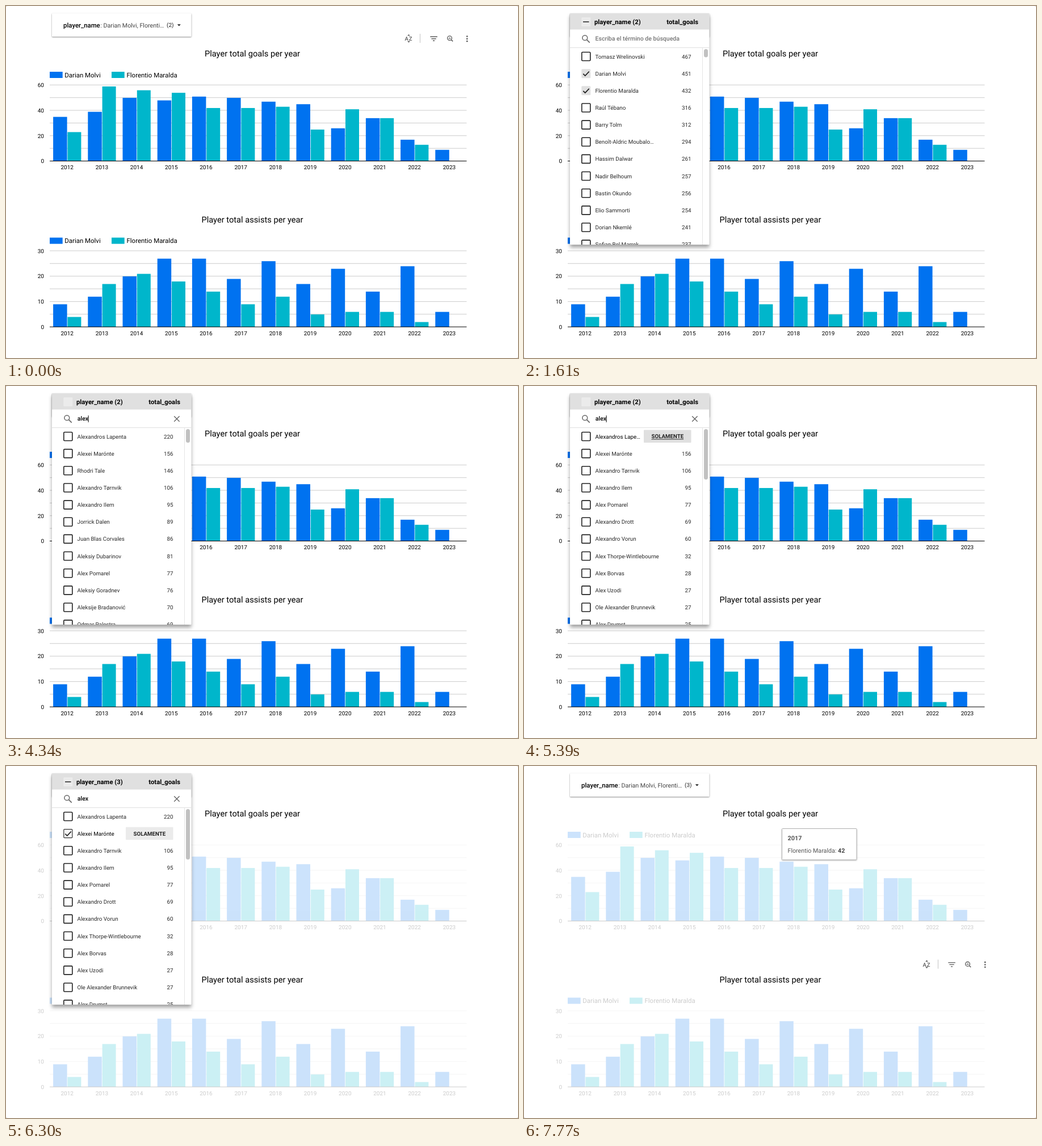
Recreate the animation shown at these times as an HTML page. Size 902 by 621 pixels, loop 8 s.

```html
<!DOCTYPE html>
<html lang="es">
<head>
<meta charset="utf-8">
<title>Player dashboard</title>
<style>
  html, body { margin: 0; width: 100%; height: 100%; overflow: hidden; background: #d4d4d4; }
  svg { display: block; width: 902px; height: 621px; background: #fff; border-radius: 3px; }
  text { font-family: Roboto, Arial, sans-serif; white-space: pre; text-rendering: geometricPrecision; }
  .card { filter: drop-shadow(0 1px 1.2px rgba(0, 0, 0, .45)); }
  .panel { filter: drop-shadow(0 5px 3.2px rgba(0, 0, 0, .36)); }
  .tip { filter: drop-shadow(0 1px 1px rgba(0, 0, 0, .25)); }
</style>
</head>
<body>
<svg viewBox="0 0 902 621">
  <defs><clipPath id="clip"><rect x="81" y="13" width="245.5" height="408"/></clipPath></defs>
  <g id="charts"></g>
  <g id="titles"></g>
  <g id="ui"></g>
</svg>
<script>
const LOOP = 8000, TICK = 70;
const BLUE = '#0072f0', TEAL = '#00b6cb', CHART_GAP = 292.6;
const PLAYERS = ['Darian Molvi', 'Florentio Maralda'];
const $ = id => document.getElementById(id);

const text = (x, y, s, size, { w = 400, fill = '#000', at = 'start', more = '' } = {}) =>
  `<text x="${x}" y="${y}" font-size="${size}" font-weight="${w}" fill="${fill}" text-anchor="${at}" ${more}>${s}</text>`;
const rect = (x, y, w, h, fill, more = '') =>
  `<rect x="${x}" y="${y}" width="${w}" height="${h}" fill="${fill}" ${more}/>`;
const line = (d, color, width) =>
  `<path d="${d}" fill="none" stroke="${color}" stroke-width="${width}"/>`;

// Charts
function chart(top, max, series) {
  const base = top + 134.2, unit = 134.2 / max;
  let out = '';
  PLAYERS.forEach((name, k) => {
    out += rect(k ? 186 : 77, top - 23.3, 22.7, 11, k ? TEAL : BLUE);
    out += text(k ? 212.5 : 103.3, top - 13.5, name, 11.45);
  });
  for (let k = 0; k <= 6; k++) {
    const y = base - k * 134.2 / 6;
    if (k) out += rect(77, y - .5, 734.5, 1, '#ccc');
    if (k % 2 === 0) out += text(67, y + 3.8, max * k / 6, 10, { at: 'end' });
  }
  // Bars sit slightly below their value, so the top edge is inset
  series.forEach((values, k) => values.forEach((v, i) => {
    const h = Math.max(0, v * unit - .4);
    out += rect(83.1 + 61.2 * i + 25.3 * k, base - h, k ? 24 : 24.5, h, k ? TEAL : BLUE);
  }));
  for (let i = 0; i < 12; i++) out += text(107.7 + 61.2 * i, base + 14.7, 2012 + i, 10, { at: 'middle' });
  return out + rect(77, base - .5, 734.5, 1, '#000');
}

$('charts').innerHTML =
  chart(139.3, 60, [
    [35, 39, 50, 48, 51, 50, 47, 45, 26, 34, 17, 9],
    [23, 59, 56, 54, 42, 42, 43, 25, 41, 34, 13, 0]]) +
  chart(139.3 + CHART_GAP, 30, [
    [9, 12, 20, 27, 27, 19, 26, 17, 23, 14, 24, 6],
    [4, 17, 21, 18, 14, 9, 12, 5, 6, 6, 2, 0]]);
$('titles').innerHTML = ['goals', 'assists'].map((s, i) =>
  text(434, 89 + CHART_GAP * i, `Player total ${s} per year`, 14.65, { at: 'middle' })).join('');

// Dropdown lists
const parse = s => s.split('|').map(r => r.match(/(.+) (\d+)/).slice(1));
const LISTS = {
  all: parse('Tomasz Wrelinovski 467|Darian Molvi 451|Florentio Maralda 432|Raúl Tébano 316|Barry Tolm 312|' +
    'Benoît-Aldric Moubalo… 294|Hassim Dalwar 261|Nadir Belhoum 257|Bastin Okundo 256|Elio Sammorti 254|' +
    'Dorian Nkemlé 241|Sofian Bel Marrek 237'),
  al: parse('Florentio Maralda 432|Hassim Dalwar 261|Alexandros Lapenta 220|Balto Ferrune 198|Donal Brisk 187|' +
    'Valdo Quirente 171|Alexei Marónte 156|Rhodri Tale 146|Galdric Monse 139|Alvino Pradesh 128|' +
    'Osval Trindo 117|Alexandro Tørnvik 106'),
  ale: parse('Alexandros Lapenta 220|Alexei Marónte 156|Rhodri Tale 146|Alexandro Tørnvik 106|Alexandro Ilem 95|' +
    'Jorrick Dalen 89|Juan Blas Corvales 86|Aleksiy Dubarinov 81|Alex Pomarel 77|Aleksiy Goradnev 76|' +
    'Aleksije Bradanović 70|Odmar Palestra 69'),
  alex: parse('Alexandros Lapenta 220|Alexei Marónte 156|Alexandro Tørnvik 106|Alexandro Ilem 95|Alex Pomarel 77|' +
    'Alexandro Drott 69|Alexandro Vorun 60|Alex Thorpe-Wintlebourne 32|Alex Borvas 28|Alex Uzodi 27|' +
    'Ole Alexander Brunnevik 27|Alex Drumst 25')
};
const THUMB = { all: 14.5, al: 14.5, ale: 24, alex: 89 };
const CARET = [126, 132, 134.7, 140, 144.6];

// Value of the last step that has begun
const pick = (t, steps) => steps.reduce((v, [at, next]) => t >= at ? next : v, null);
const clamp = v => Math.min(1, Math.max(0, v));

function checkbox(y, checked, fill) {
  if (!checked) return rect(101.8, y - 7.5, 15, 15, '#fff', 'rx="1.2" stroke="#222" stroke-width="1.6"');
  const edge = 1 - fill;
  return rect(101.3, y - 8, 16, 16, '#e0e0e0', `rx="1.5" fill-opacity="${.3 + .7 * fill}"`) +
    rect(101.8, y - 7.5, 15, 15, 'none', `rx="1.2" stroke="#333" stroke-width="1.2" stroke-opacity="${edge}"`) +
    line(`M104.3 ${y + .5}l3.4 3.4 7-7.4`, '#222', 1.7);
}

function row([name, goals], i, t, hover, fill) {
  const y = 89 + 30.15 * i, over = hover === i;
  const checked = PLAYERS.includes(name) || (t >= 6230 && name === 'Alexei Marónte');
  const label = over && i === 0 ? 'Alexandros Lape…' : name;
  let out = checkbox(y, checked, name === 'Alexei Marónte' ? fill : 1) +
    text(125.5, y + 3.5, label, 9.8, { fill: over ? '#000' : '#2a2a2a' });
  if (!over) return out + text(294.5, y + 3.5, goals, 9.8, { fill: '#2a2a2a', at: 'end' });
  return out + rect(211, y - 11.5, 83.5, 22.5, i ? '#ebebeb' : '#e0e0e0', 'rx="1"') +
    text(252.8, y + 3.4, 'SOLAMENTE', 9.7, { w: 700, fill: '#222', at: 'middle', more: i ? '' : 'text-decoration="underline"' });
}

function panel(t) {
  const list = pick(t, [[0, 'all'], [3710, 'al'], [4060, 'ale'], [4480, 'alex']]);
  const query = pick(t, [[0, ''], [3430, 'a'], [3640, 'al'], [3990, 'ale'], [4340, 'alex']]);
  const caret = pick(t, [[0, 0], [3010, 1], [4900, 0], [5390, 1], [5950, 0]]);
  const hover = pick(t, [[0, -1], [4900, 0], [5670, -1], [5740, 1], [7000, -1]]);
  const count = t < 6230 ? 2 : 3;
  const some = t < 4060 || t >= 6230;
  const fill = clamp((t - 6300) / 280);
  const grow = 1 - (1 - clamp((t - 1225) / 200)) ** 3;
  const shown = clamp((t - 1325) / 280);

  let body = rect(81, 13, 245.5, 28.5, '#e0e0e0') + rect(101.3, 20, 16, 16, '#ebebeb', 'rx="1.5"');
  if (some) body += rect(104, 27.2, 10.5, 1.5, '#222');
  body += text(124, 32, `player_name (${count})`, 11.3, { w: 700 }) + text(307, 32, 'total_goals', 11.3, { w: 700, at: 'end' });
  body += '<circle cx="107.3" cy="56.2" r="4.4" fill="none" stroke="#666" stroke-width="1.5"/>' + line('M110.5 59.4l5.2 5.2', '#666', 1.7);
  body += query ? text(125.7, 61.3, query, 10.6, { w: 500 })
    : text(125.5, 61.3, 'Escriba el término de búsqueda', 10.55, { w: 500, fill: '#757575' });
  if (caret) body += rect(CARET[query.length], 52, 1, 12, '#000');
  if (t >= 3710) body += line('M296.2 53.3l9.4 9.4m0-9.4l-9.4 9.4', '#666', 1.4);
  body += rect(81, 73, 245.5, 1, '#e0e0e0') + rect(314, 74, 1, 347, '#e4e4e4');
  body += rect(317, 76, 7, THUMB[list], '#c1c1c1', 'rx="3.5"');
  body += LISTS[list].map((r, i) => row(r, i, t, hover, fill)).join('');

  return `<g opacity="${grow}" transform="translate(0 13) scale(1 ${.1 + .9 * grow}) translate(0 -13)">` +
    rect(81, 13, 245.5, 408, '#fff', 'class="panel" rx="1"') +
    `<g clip-path="url(#clip)" opacity="${shown}">${body}</g></g>`;
}

function filterCard(count) {
  return rect(81, 13, 245.5, 41, '#fff', 'class="card" rx="1"') +
    text(101, 37.6, 'player_name', 11.4, { w: 500 }) +
    text(166.2, 37.6, `: ${PLAYERS[0]}, Florenti…`, 10.7, { fill: '#444' }) +
    text(283, 36.8, `(${count})`, 10, { fill: '#222' }) +
    '<path d="M301.8 32.3h6l-3 3.2z" fill="#222"/>';
}

function toolbar(dy) {
  const c = '#5a5a5a';
  let out = text(702.6, 61, 'A', 9.6, { w: 500, fill: c }) + text(709.8, 61, 'Z', 9.6, { w: 500, fill: c }) +
    `<path d="M707 52.6h5l-2.5-2.6zM707 61.9h5l-2.5 2.6z" fill="${c}"/>` +
    rect(729, 49, 1, 16, '#c4c4c4') +
    line('M747.3 54.3h12.6M749.4 57.8h8.4M752 61.3h3.2', c, 1.4) +
    `<circle cx="781.6" cy="56.8" r="3.9" fill="none" stroke="${c}" stroke-width="1.3"/>` +
    line('M784.4 59.6l2.8 2.8', c, 1.5) + line('M780.1 56.5v2M781.6 55v3.5M783.1 56v2.5', c, .8);
  for (let k = 0; k < 3; k++) out += `<circle cx="812.3" cy="${53.6 + 4.3 * k}" r="1.35" fill="${c}"/>`;
  return `<g transform="translate(0 ${dy})">${out}</g>`;
}

function tooltip() {
  return rect(454.5, 110.5, 131.5, 55, '#fff', 'class="tip" rx="1" stroke="#b0b0b0"') +
    text(464.5, 130.6, '2017', 10.9, { w: 700, fill: '#555' }) +
    text(464.5, 152.6, `${PLAYERS[1]}: <tspan font-weight="700" fill="#444">42</tspan>`, 10.7, { fill: '#555' });
}

function render(t) {
  $('charts').setAttribute('opacity', t < 6300 ? 1 : .2);
  let out = filterCard(t < 6230 ? 2 : 3);
  if (t < 210) out += toolbar(0);
  if (t >= 1260 && t < 7070) out += panel(t);
  if (t >= 7700) out += tooltip();
  if (t >= 7770) out += toolbar(CHART_GAP);
  $('ui').innerHTML = out;
}

let last = -1;
function frame() {
  const t = Math.floor(performance.now() % LOOP / TICK) * TICK;
  if (t !== last) render(last = t);
  requestAnimationFrame(frame);
}
frame();
</script>
</body>
</html>
```
